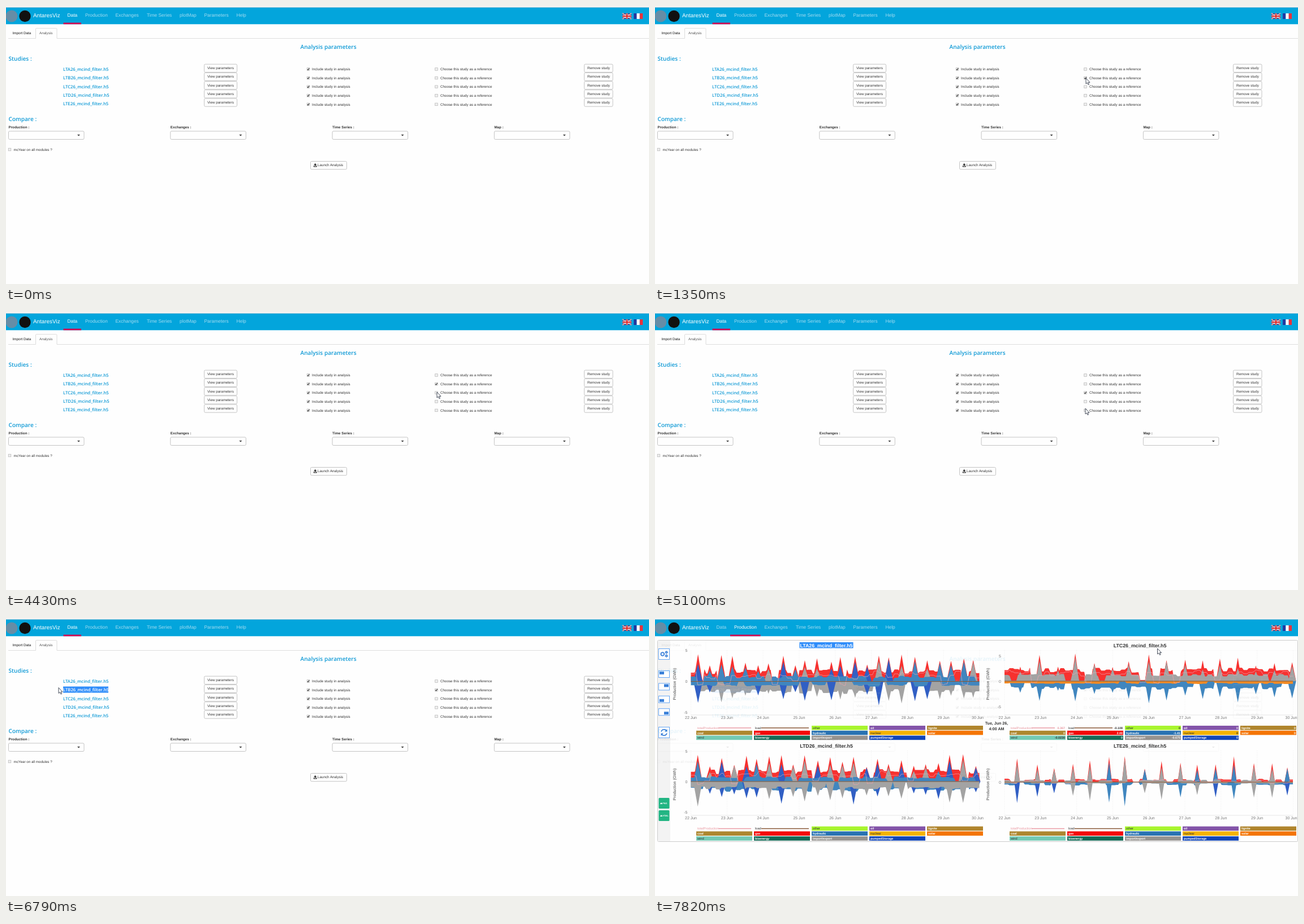
These frames come from a looping animation (1137 by 493 pixels, 8 s). An HTML page:

```html
<!DOCTYPE html>
<html lang="en">
<head>
<meta charset="utf-8">
<title>Study analysis</title>
<style>
  html, body { margin: 0; width: 100%; height: 100%; overflow: hidden; background: #fefefe; }
  svg { display: block; width: 100vw; height: 100vh; font-family: "Liberation Sans", Arial, sans-serif; }
  text { white-space: pre; text-rendering: geometricPrecision; }
  .head { font-family: "Open Sans", "Noto Sans", sans-serif; font-weight: 600; }
</style>
</head>
<body>
<svg id="stage" viewBox="0 0 1137 493"></svg>
<script>
const LOOP = 8000;
const BLUE = '#0f9ad6', INK = '#333';
const studies = ['A', 'B', 'C', 'D', 'E'].map(c => `LT${c}26_mcind_filter.h5`);
const range = n => [...Array(n).keys()];

const text = (x, y, s, size = 6.25, fill = INK, extra = '') =>
  `<text x="${x}" y="${y}" font-size="${size}" fill="${fill}" ${extra}>${s}</text>`;
const rect = (x, y, w, h, fill, extra = '') =>
  `<rect x="${x}" y="${y}" width="${w}" height="${h}" fill="${fill}" ${extra}/>`;
const path = (d, fill, extra = '') => `<path d="${d}" fill="${fill}" ${extra}/>`;
const circle = (x, y, r, fill, extra = '') => `<circle cx="${x}" cy="${y}" r="${r}" fill="${fill}" ${extra}/>`;
const group = (id, content) => `<g id="${id}">${content}</g>`;
const BOLD = 'font-weight="700"', MIDDLE = 'text-anchor="middle"', END = 'text-anchor="end"';

// ---- Top bar ----
const menu = ['Data', 'Production', 'Exchanges', 'Time Series', 'plotMap', 'Parameters', 'Help'];
const menuX = [108.5, 140, 193.5, 249, 307, 350.5, 407.5];

function topBar() {
  const cross = (d, color, width) => path(d, 'none', `stroke="${color}" stroke-width="${width}"`);
  const diagonals = 'M1090 13l16 10M1106 13l-16 10', upright = 'M1098 13v10M1090 18h16';
  const uk = rect(1090, 13, 16, 10, '#26357d')
    + cross(diagonals, '#fff', 2) + cross(diagonals, '#d22', .8)
    + cross(upright, '#fff', 3.4) + cross(upright, '#d22', 2);
  const france = ['#2238a0', '#fff', '#e8323c']
    .map((c, i) => rect(1110 + i * 5.33, 13, 5.34, 10, c)).join('');
  return rect(0, 1.5, 1137, 1.2, '#c9cfd1') + rect(0, 2.7, 1137, 29.6, '#03a5dc')
    + circle(10, 18, 10.5, '#668da6') + circle(33.5, 18, 10.2, '#111')
    + text(48, 20.3, 'AntaresViz', 9.9, '#fff')
    + menu.map((s, i) => text(menuX[i], 19, s, 8.35, '#fff', 'class="menu"')).join('')
    + rect(0, 29.6, 0, 2.7, '#d4024f', 'id="underline"') + uk + france;
}

// ---- Analysis page ----
const rowY = i => 112 + i * 15.6;

function button(x, y, w, label, indent = 6) {
  return rect(x + .5, y + .5, w, 14.2, 'none', 'stroke="#c4c4c4" rx="2"') + text(x + indent, y + 9.4, label);
}
function checkbox(x, y, id, checked) {
  return rect(x - 2.3, y - 2.3, 4.6, 4.6, '#eee', 'stroke="#b4b4b4" stroke-width=".7"')
    + path(`M${x - 1.6} ${y}l1.2 1.4l2.2-3`, 'none',
      `id="${id}" stroke="#333" stroke-width="1.1" visibility="${checked ? 'visible' : 'hidden'}"`);
}
function studyRow(name, i) {
  const y = rowY(i), buttonY = 102.7 + i * 15.2;
  const highlight = i === 1 ? rect(101, 121.5, 80, 11, '#2f8dfa', 'id="highlight"') : '';
  return highlight + text(101, 115 + i * 15.25, name, 7.7, BLUE, `class="head" id="name${i}"`)
    + button(350, buttonY, 58, 'View parameters')
    + checkbox(534.5, y, 'include' + i, true) + text(541, y + 2.1, 'Include study in analysis')
    + checkbox(761, y, 'reference' + i, false) + text(768, y + 2.1, 'Choose this study as a reference')
    + button(1022, buttonY, 50.5, 'Remove study');
}
function select(label, i) {
  const x = 4.5 + i * 286.3;
  return text(x, 216.6, label + ' :', 6.25, INK, BOLD)
    + rect(x, 222, 133.5, 14.5, 'none', 'stroke="#c4c4c4" rx="2"')
    + path(`M${x + 121.5} 228h5l-2.5 2.6z`, INK);
}
function analysisPage() {
  return path('M4 57.5H52.5V41q0-1.5 1.5-1.5H88.5q1.5 0 1.5 1.5V57.5H1137', 'none', 'stroke="#ddd"')
    + text(11.5, 50.2, 'Import Data', 6.25, '#111') + text(59, 50.2, 'Analysis', 6.25, '#555')
    + text(570, 76.4, 'Analysis parameters', 10.1, BLUE, `class="head" ${MIDDLE}`)
    + text(4.5, 97, 'Studies :', 10.1, BLUE, 'class="head"')
    + studies.map(studyRow).join('')
    + text(4.5, 204, 'Compare :', 10.1, BLUE, 'class="head"')
    + ['Production', 'Exchanges', 'Time Series', 'Map'].map(select).join('')
    + checkbox(6.5, 254.5, 'mcYear', false) + text(13.5, 256.7, 'mcYear on all modules ?')
    + button(538, 275, 64, 'Launch Analysis', 13)
    + path('M546.8 279l2.7 2.8h-1.7v2h-2v-2h-1.7zM543.8 283.2h1.4v1.2h3.2v-1.2h1.4v2.4h-6z', INK);
}

// ---- Production page ----
const random = n => { const v = Math.sin(n * 12.9898) * 43758.5453; return v - Math.floor(v); };
const pick = (list, n) => list[Math.floor(random(n) * list.length)];
const STEP = 3, PLOT_WIDTH = 510, DAY = 63.8;
const RED = '#f7312f', GREY = '#a3a3a3', HYDRO = '#4086bf', PUMP = '#315fc4', ORANGE = '#f28b25';

// Flat-topped blocks that pause at random; busy is the share of time they are present.
const blocks = (seed, height, busy) => range(PLOT_WIDTH / STEP + 1).map(k =>
  height * (random(seed + Math.floor(k / 4)) < busy ? .6 + .4 * random(seed * 3 + Math.floor(k / 3)) : .08));
const trace = (x, y, heights) => heights.map((h, k) => `${x + k * STEP},${(y - h).toFixed(1)}`).join(' ');
const area = (x, y, heights, fill) =>
  path(`M${x} ${y}L${trace(x, y, heights)}L${x + PLOT_WIDTH} ${y}Z`, fill);

// Peaks come at a regular daily rhythm, with production above mirrored by use below.
function spikes({ x, zero, gap, first, half, tall, fills, drains }, seed) {
  const peak = (at, h, fill) => path(`M${at - half} ${zero}L${at} ${zero - h}L${at + half} ${zero}Z`, fill);
  return range(Math.floor((PLOT_WIDTH - first) / gap) + 1).map(i => {
    const n = seed + i * 7;
    const at = x + first + i * gap + 6 * (random(n) - .5);
    const up = tall * (.5 + .5 * random(n + 1)), down = up * (.65 + .3 * random(n + 2));
    return peak(at, up, RED) + peak(at, up * (.55 + .4 * random(n + 3)), pick(fills, n + 4))
      + peak(at, -down, pick(drains, n + 5));
  }).join('');
}

const mixed = { x: 63.5, gap: DAY / 3, first: 12, half: 8, tall: 50, busy: .65, blocks: [22, 10, 22, 9],
  band: HYDRO, fills: [HYDRO, GREY, PUMP], drains: [GREY, GREY, PUMP], under: [GREY, HYDRO] };
const charts = [
  { ...mixed, study: 0, zero: 112.5, unit: 11 },
  { ...mixed, study: 2, x: 618, zero: 112, unit: 9, gap: DAY / 2, first: 30, half: 7, tall: 49, busy: .9,
    blocks: [24, 13, 15, 5], band: GREY, fills: [GREY], drains: [HYDRO], under: [HYDRO, ORANGE] },
  { ...mixed, study: 3, zero: 290, unit: 10.8, busy: .85, blocks: [22, 9, 18, 14], under: [HYDRO, GREY] },
  { ...mixed, study: 4, x: 618, zero: 291, unit: 0, gap: DAY / 2, first: 24, half: 5, tall: 46, busy: .6,
    blocks: [6, 4, 6, 3], band: GREY, fills: [GREY, GREY, HYDRO], drains: [HYDRO, GREY, PUMP], under: [HYDRO, GREY] },
];

function chart(c, i) {
  const { x, zero, unit } = c, seed = 40 + i * 57;
  const lower = i > 1, selected = i === 0;
  const titleX = x + 239.5, bottom = lower ? 350 : 172;
  const [red, band, deep, shallow] = c.blocks.map((h, k) => blocks(seed + k * 11, h, c.busy));
  const negative = list => list.map(h => -h);
  const total = red.map((h, k) => h * .9 - deep[k] * .4);
  const days = range(9).map(d => `M${x + d * DAY} ${bottom}v-115`).join('');
  const ticks = unit ? [5, 0, -5] : [0];
  return path(days, 'none', 'stroke="#ddd" stroke-width=".5" stroke-dasharray="1 2"')
    + area(x, zero, red, RED) + area(x, zero, negative(deep), c.under[0])
    + spikes(c, seed) + area(x, zero, band, c.band) + area(x, zero, negative(shallow), c.under[1])
    + `<polyline points="${trace(x, zero, total)}" fill="none" stroke="#efa3ae" stroke-width=".7"/>`
    + path(`M${x} ${zero}h${PLOT_WIDTH}`, 'none', 'stroke="#8e582f"')
    + path(`M${x} ${bottom}h${PLOT_WIDTH}`, 'none', 'stroke="#ccc" stroke-width=".5"')
    + ticks.map(v => text(x - 6, zero - v * unit + 2.5, v, 7, '#777', END)).join('')
    + range(9).map(d => text(x + Math.min(d * DAY, 507), bottom + 6.8, `${22 + d} Jun`, 7, '#777', MIDDLE)).join('')
    + text(0, 0, 'Production (GWh)', 7.1, '#444',
      `${MIDDLE} transform="translate(${x - 27} ${lower ? 295 : 117}) rotate(-90)"`)
    + (selected ? rect(titleX - 47.5, 43, 95, 10.5, '#2f8dfa') : '')
    + text(titleX, lower ? 229.8 : 51.5, studies[c.study], 8.86, selected ? '#fff' : INK, `${BOLD} ${MIDDLE}`);
}

// Label, colour, value under the pointer.
const series = [
  ['totalProduction', '#e998a2', '0.367'], ['load', '#82502d', '-0.108'], ['other', '#a8f52e', 0],
  ['oil', '#8354a9', 0], ['lignite', '#b0852d', 0],
  ['coal', '#ad872f', 0], ['gas', '#f40808', '2.00'], ['hydraulic', '#2872b2', '-1.41'],
  ['nuclear', '#f4b300', 0], ['solar', '#f47505', 0],
  ['wind', '#73cab4', '-0.0230'], ['bioenergy', '#156b57', 0], ['import/export', '#969390', '-0.675'],
  ['pumpedStorage', '#1246b8', 0],
];
const darkLabels = ['totalProduction', 'load', 'other', 'nuclear', 'wind'];

function legend(x0, y0, withValues) {
  return series.map(([label, color, value], i) => {
    const x = x0 + i % 5 * 102, y = y0 + Math.floor(i / 5) * 8.8;
    const dark = darkLabels.includes(label), ink = i === 0 ? color : dark ? INK : '#fff';
    const lineX = x + 39 - i * 26, lineEnd = x + (withValues ? 80 : 97);
    const swatch = i < 2 ? rect(lineX, y + 3.2, lineEnd - lineX, 1.4, color) : rect(x, y, 99, 7.6, color);
    return swatch + text(x + 2, y + 5.8, label, dark ? 5.7 : 5.3, ink, dark ? '' : BOLD)
      + (withValues ? text(x + 98, y + 5.8, value, 5.4, ink, `${BOLD} ${END}`) : '');
  }).join('');
}

function sidebar() {
  const blue = '#397fd8';
  const frame = (y, h) => rect(6.5, y + .5, 19, h, '#fff', 'stroke="#65a6f4"');
  const gear = (x, y, r) => circle(x, y, r, 'none', `stroke="${blue}" stroke-width="1.5"`)
    + circle(x, y, r + 1, 'none', `stroke="${blue}" stroke-dasharray="1.3"`);
  const layouts = range(4).map(i => {
    const y = 93 + i * 22.4;
    return frame(y, 12) + rect(i % 2 ? 16 : 8, y + (i < 2 ? 2 : 6), 8, 5, blue);
  }).join('');
  const exports = ['PNG', 'HTML'].map((s, i) => {
    const y = 330 + i * 22;
    return rect(6.5, y - 11, 19, 19, '#22b583', 'rx="1.5"') + path(`M9 ${y}l2-3l2 3z`, '#fff')
      + text(13.2, y, s, 3.8, '#fff', BOLD);
  }).join('');
  return rect(5, 40, 22, 356, '#f3f3f3') + frame(54, 19)
    + gear(13.3, 64, 2.7) + gear(20.2, 60.8, 1.4) + gear(20.2, 67.2, 1.4) + layouts + frame(193, 19)
    + path('M11 201.5a5.2 5.2 0 0 1 9-2M21 204.5a5.2 5.2 0 0 1-9 2', 'none', `stroke="${blue}" stroke-width="1.7"`)
    + path('M21.5 197v4.5h-4.5zM10.5 209v-4.5h4.5z', blue) + exports;
}
function productionPage() {
  return rect(4.5, 39.5, 1132, 357, '#fefefe', 'stroke="#ccc" rx="2"') + sidebar()
    + charts.map(chart).join('')
    + [191, 369.6].map(y => legend(73, y, false) + legend(627, y, y === 191)).join('')
    + ['Tue, Jun 26,', '4:00 AM'].map((s, i) =>
      text(604, 188.8 + i * 10.2, s, 7.1, INK, `${BOLD} ${MIDDLE}`)).join('');
}

document.getElementById('stage').innerHTML = rect(0, 0, 1137, 493, '#fefefe')
  + group('production', productionPage()) + group('analysis', analysisPage()) + topBar()
  + path('M0 0V10L2.3 8L4 11.6L5.6 10.9L4.1 7.5H7Z', '#fff', 'id="pointer" stroke="#333a4a" stroke-width=".9"');

// ---- Animation ----
// Pointer stops: start time, x, y. The pointer jumps between them.
const stops = [
  [0, -50, -50], [330, 914, 444], [670, 759, 167], [1010, 762, 108], [1350, 762, 128],
  [3740, 757.5, 144], [4080, 760, 140], [4430, 762, 142], [5100, 761, 171], [5440, 761, 173],
  [6120, 189, 124], [6460, 93, 123.5], [7480, 470, 238], [7820, 888.5, 54],
];
// Reference study: start time, row.
const references = [[0, -1], [1350, 1], [4760, 2], [5780, 4], [6120, 1]];
const SELECT_AT = 6460, LAUNCH_AT = 7820;

const el = id => document.getElementById(id);
const show = (id, on) => el(id).setAttribute('visibility', on ? 'visible' : 'hidden');
const current = (list, t) => list.findLast(item => item[0] <= t);
const menuItems = document.querySelectorAll('.menu');

function draw() {
  const t = performance.now() % LOOP;
  const [, x, y] = current(stops, t), [, reference] = current(references, t);
  const launched = t >= LAUNCH_AT, selected = t >= SELECT_AT;
  el('pointer').setAttribute('transform', `translate(${x} ${y})`);
  studies.forEach((_, i) => show('reference' + i, i === reference));
  show('highlight', selected);
  el('name1').setAttribute('fill', selected ? '#fff' : BLUE);
  show('production', launched);
  el('analysis').setAttribute('opacity', launched ? .1 : 1); // a faint trace of the old page remains
  const active = launched ? 1 : 0;
  menuItems.forEach((item, i) => item.setAttribute('fill', i === active ? '#fff' : '#a3dcf1'));
  el('underline').setAttribute('x', menuX[active] - 7);
  el('underline').setAttribute('width', menuX[active + 1] - menuX[active]);
  requestAnimationFrame(draw);
}
draw();
</script>
</body>
</html>
```
